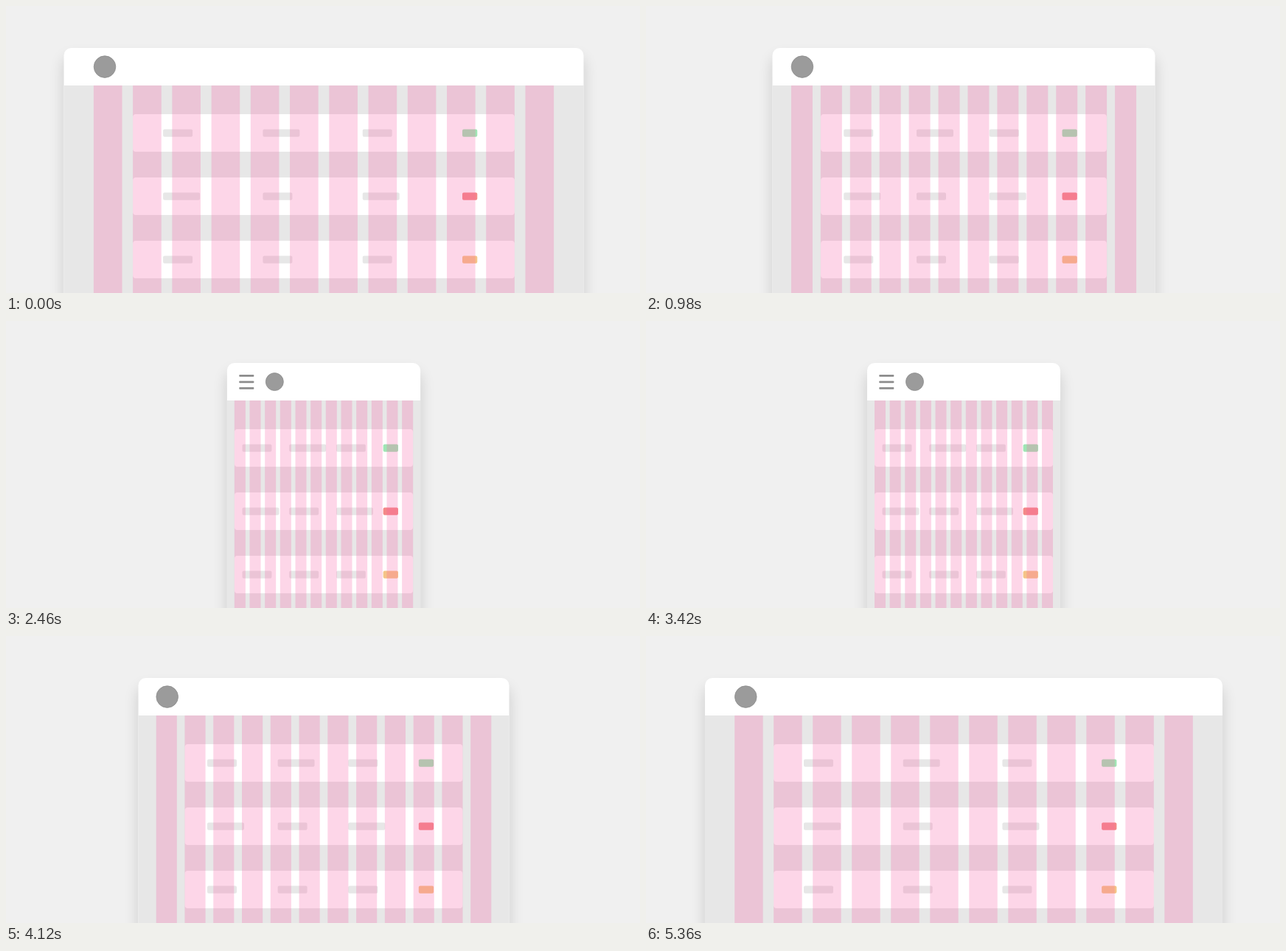
An HTML page that plays this animation: 860 by 390 pixels, repeating every 5.8 s.

```html
<!DOCTYPE html>
<html lang="en">
<head>
<meta charset="utf-8">
<title>Responsive column grid</title>
<style>
  html, body { margin: 0; width: 100%; height: 100%; overflow: hidden; background: #f0f0f0; }
  svg { display: block; width: 860px; height: 390px; }
</style>
</head>
<body>
<svg id="stage" viewBox="0 0 860 390">
  <defs>
    <filter id="soft" filterUnits="userSpaceOnUse" x="0" y="0" width="860" height="560">
      <feGaussianBlur stdDeviation="10"/>
    </filter>
  </defs>
</svg>
<script>
const LOOP = 5800, LAST_CHANGE = 5360, TICK = 20, DURATION = 622;
const CENTER = 431, COLUMNS = 12, COLUMN_RATIO = 0.725;

const desktop = { width: 705, margin: 40.4, inset: 93.7, pad: 40.9, step: 135.3, logoX: 134, logoR: 15, menu: 0 };
const tablet = { width: 503, margin: 24.2, inset: 63.2, pad: 30.3, step: 95.6, logoX: 218.7, logoR: 15, menu: 0 };
const phone = { width: 262, margin: 10, inset: 10, pad: 10.5, step: 63.7, logoX: 364.5, logoR: 12.2, menu: 1 };

const moves = [
  { start: 733, from: desktop, to: tablet },
  { start: 1998, from: tablet, to: phone },
  { start: 3420, from: phone, to: tablet },
  { start: 5007, from: tablet, to: desktop },
];

const rows = [
  { bars: [40, 50, 40], status: '#a0e5b4' },
  { bars: [50, 40, 50], status: '#f48888' },
  { bars: [40, 40, 40], status: '#f5c487' },
];

const stage = document.getElementById('stage');

function set(node, attrs) {
  for (const key in attrs) node.setAttribute(key, attrs[key]);
}

function add(tag, attrs, parent = stage) {
  const node = document.createElementNS('http://www.w3.org/2000/svg', tag);
  set(node, attrs);
  return parent.appendChild(node);
}

const shadow = add('rect', { y: 70, height: 460, rx: 10, fill: '#000', opacity: 0.15, filter: 'url(#soft)' });
const frame = add('rect', { y: 57, height: 400, rx: 10, fill: '#fff' });
const body = add('rect', { y: 108, height: 300, fill: '#e7e7e7' });

const cards = rows.map((row, i) => {
  const y = 147 + i * 86;
  const card = add('rect', { y, height: 51, rx: 4, fill: '#fff' });
  const pill = (width, fill) => add('rect', { y: y + 20.5, width, height: 10.2, rx: 2, fill });
  const pills = row.bars.map(width => pill(width, '#e7e7e7'));
  pills.push(pill(20.3, row.status));
  return { card, pills };
});

const columns = Array.from({ length: COLUMNS }, () =>
  add('rect', { y: 108, height: 300, fill: 'rgb(247,91,163)', 'fill-opacity': 0.25 }));

const logo = add('circle', { cy: 82.6, fill: '#9b9b9b', stroke: '#8c8c8c', 'stroke-width': 0.8 });
const menu = add('g', { fill: '#8c8c8c' });
[73, 81.5, 90].forEach(y => add('rect', { x: 316.3, y, width: 20, height: 2.8, rx: 0.8 }, menu));

function poseAt(time) {
  const move = moves.filter(m => m.start <= time).pop();
  if (!move) return desktop;
  const t = Math.min(1, (time - move.start) / DURATION);
  const eased = 1 - (1 - t) ** 5;
  const pose = {};
  for (const key in desktop) pose[key] = move.from[key] + (move.to[key] - move.from[key]) * eased;
  return pose;
}

function draw(time) {
  const { width, margin, inset, pad, step, logoX, logoR, menu: menuOpacity } = poseAt(time);
  const left = CENTER - width / 2;
  for (const part of [shadow, frame, body]) set(part, { x: left, width });

  const pitch = (width - 2 * margin) / (COLUMNS - 1 + COLUMN_RATIO);
  columns.forEach((column, i) =>
    set(column, { x: left + margin + i * pitch, width: pitch * COLUMN_RATIO }));

  for (const { card, pills } of cards) {
    set(card, { x: left + inset, width: width - 2 * inset });
    pills.forEach((pill, i) => set(pill, { x: left + inset + pad + i * step }));
  }

  set(logo, { cx: logoX, r: logoR - 0.2 });
  set(menu, { opacity: menuOpacity });
}

const begin = performance.now();
function tick() {
  const time = (performance.now() - begin) % LOOP;
  draw(Math.min(LAST_CHANGE, Math.floor(time / TICK) * TICK));
  requestAnimationFrame(tick);
}
tick();
</script>
</body>
</html>
```
